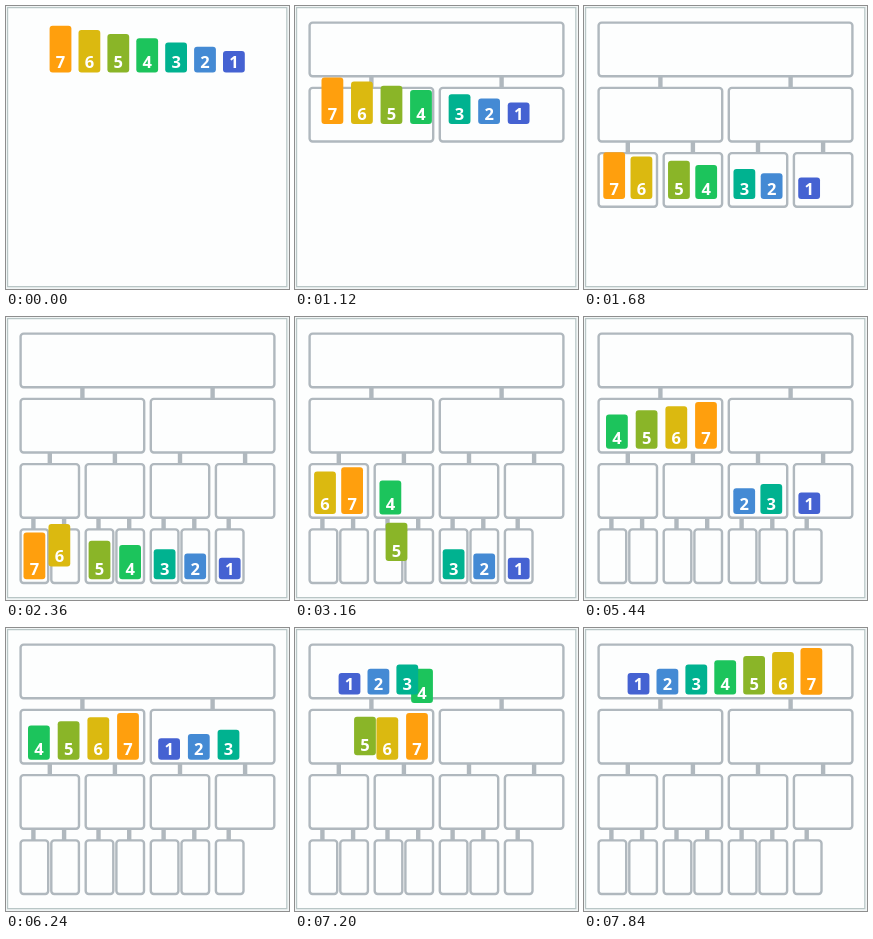
An HTML page with a canvas that plays this animation: 283 px wide and 283 px high, repeating every 8 s.

```html
<!DOCTYPE html>
<html lang="en">
<head>
<meta charset="utf-8">
<title>Merge sort</title>
<style>
html, body { margin: 0; width: 100%; height: 100%; overflow: hidden; background: #fdfefe; }
canvas { display: block; width: 100vw; height: 100vh; }
</style>
</head>
<body>
<canvas id="stage"></canvas>
<script>
const SIZE = 283, LOOP = 8000;
const ROW = 65.25, BOX_H = 53.6, BAR_W = 21.8;
const SPLIT_MS = 400, MERGE_MS = 340, STAGGER = 190;
const COLORS = ['#4562d2', '#448ad4', '#00b290', '#1cc45c', '#8ab528', '#dbb910', '#ff9f0d'];
const SPLITS = [850, 1350, 1850];

// Each merge: start time, level reached, first slot, values in order of arrival
const MERGES = [
  [2255, 2, 0, [6, 7]],
  [2844, 2, 2, [4, 5]],
  [3485, 1, 0, [4, 5, 6, 7]],
  [4475, 2, 4, [2, 3]],
  [5085, 2, 6, [1]],
  [5525, 1, 4, [1, 2, 3]],
  [6378, 0, 0, [1, 2, 3, 4, 5, 6, 7]]
];

const canvas = document.getElementById('stage');
const ctx = canvas.getContext('2d');

const clamp = v => Math.min(1, Math.max(0, v));
const ease = t => t < 0.5 ? 2 * t * t : 1 - 2 * (1 - t) * (1 - t);

function slotX(level, s) {
  if (level === 0) return 43.6 + 28.9 * s;
  if (level === 1) return 22 + 130.2 * (s >> 2) + 29.7 * (s & 3);
  if (level === 2) return 19.1 + 65.1 * (s >> 1) + 27.1 * (s & 1);
  return 17.5 + 65.1 * (s >> 1) + 30.6 * (s & 1);
}

const place = (level, slot) => ({ x: slotX(level, slot), y: 66.4 + ROW * level });

const bars = COLORS.map((color, i) => {
  const n = i + 1, slot = 7 - n;
  const moves = SPLITS.map((start, k) => ({ start, ms: SPLIT_MS, to: place(k + 1, slot) }));
  for (const [start, level, first, values] of MERGES) {
    const k = values.indexOf(n);
    if (k >= 0) moves.push({ start: start + STAGGER * k, ms: MERGE_MS, to: place(level, first + k) });
  }
  return { n, color, moves, home: place(0, slot), h: 17.3 + 4.2 * n };
}).reverse(); // smaller values are painted on top

function position(bar, time) {
  let { x, y } = bar.home;
  for (const { start, ms, to } of bar.moves) {
    if (time <= start) break;
    const p = ease(clamp((time - start) / ms));
    x += (to.x - x) * p;
    y += (to.y - y) * p;
  }
  return { x, y };
}

function boxRect(level, i) {
  const widths = [253.8, 123.6, 58.4, 27.6];
  const x = level < 3 ? [0, 130.2, 65.1][level] * i : 65.1 * (i >> 1) + 30.7 * (i & 1);
  return { x: 14.6 + x, y: 16.6 + ROW * level, w: widths[level] };
}

function drawLevel(level, time) {
  const start = SPLITS[Math.max(0, level - 1)] - 150;
  if (time <= start) return;
  ctx.globalAlpha = clamp((time - start) / 130);
  ctx.strokeStyle = '#b0b8be';
  const count = [1, 2, 4, 7][level];
  for (let i = 0; i < count; i++) {
    const { x, y, w } = boxRect(level, i);
    if (level) {
      const mid = x + w / 2 - (level === 3 ? 1 : 0);
      ctx.lineWidth = 4.4;
      ctx.beginPath();
      ctx.moveTo(mid, y - ROW + BOX_H);
      ctx.lineTo(mid, y);
      ctx.stroke();
    }
    ctx.lineWidth = 2.4;
    ctx.beginPath();
    ctx.roundRect(x, y, w, BOX_H, 3);
    ctx.stroke();
  }
  ctx.globalAlpha = 1;
}

function drawBar(bar, time) {
  const { x, y } = position(bar, time);
  ctx.fillStyle = bar.color;
  ctx.beginPath();
  ctx.roundRect(x, y - bar.h, BAR_W, bar.h, 3);
  ctx.fill();
  ctx.fillStyle = '#fff';
  ctx.fillText(bar.n, x + BAR_W / 2, y - 4.4);
}

function draw(time) {
  ctx.fillStyle = '#f1f5f5';
  ctx.fillRect(0, 0, SIZE, SIZE);
  ctx.fillStyle = '#fdfefe';
  ctx.strokeStyle = '#b9c6c6';
  ctx.lineWidth = 1.2;
  ctx.beginPath();
  ctx.rect(1.6, 1.6, 279.2, 279);
  ctx.fill();
  ctx.stroke();

  for (let level = 0; level < 4; level++) drawLevel(level, time);
  ctx.font = '700 16.5px "Open Sans", "Noto Sans", sans-serif';
  ctx.textAlign = 'center';
  for (const bar of bars) drawBar(bar, time);
}

function resize() {
  const ratio = window.devicePixelRatio || 1;
  canvas.width = Math.round(innerWidth * ratio);
  canvas.height = Math.round(innerHeight * ratio);
  ctx.setTransform(canvas.width / SIZE, 0, 0, canvas.height / SIZE, 0, 0);
}

function frame() {
  draw(performance.now() % LOOP);
  requestAnimationFrame(frame);
}

addEventListener('resize', resize);
resize();
frame();
</script>
</body>
</html>
```
